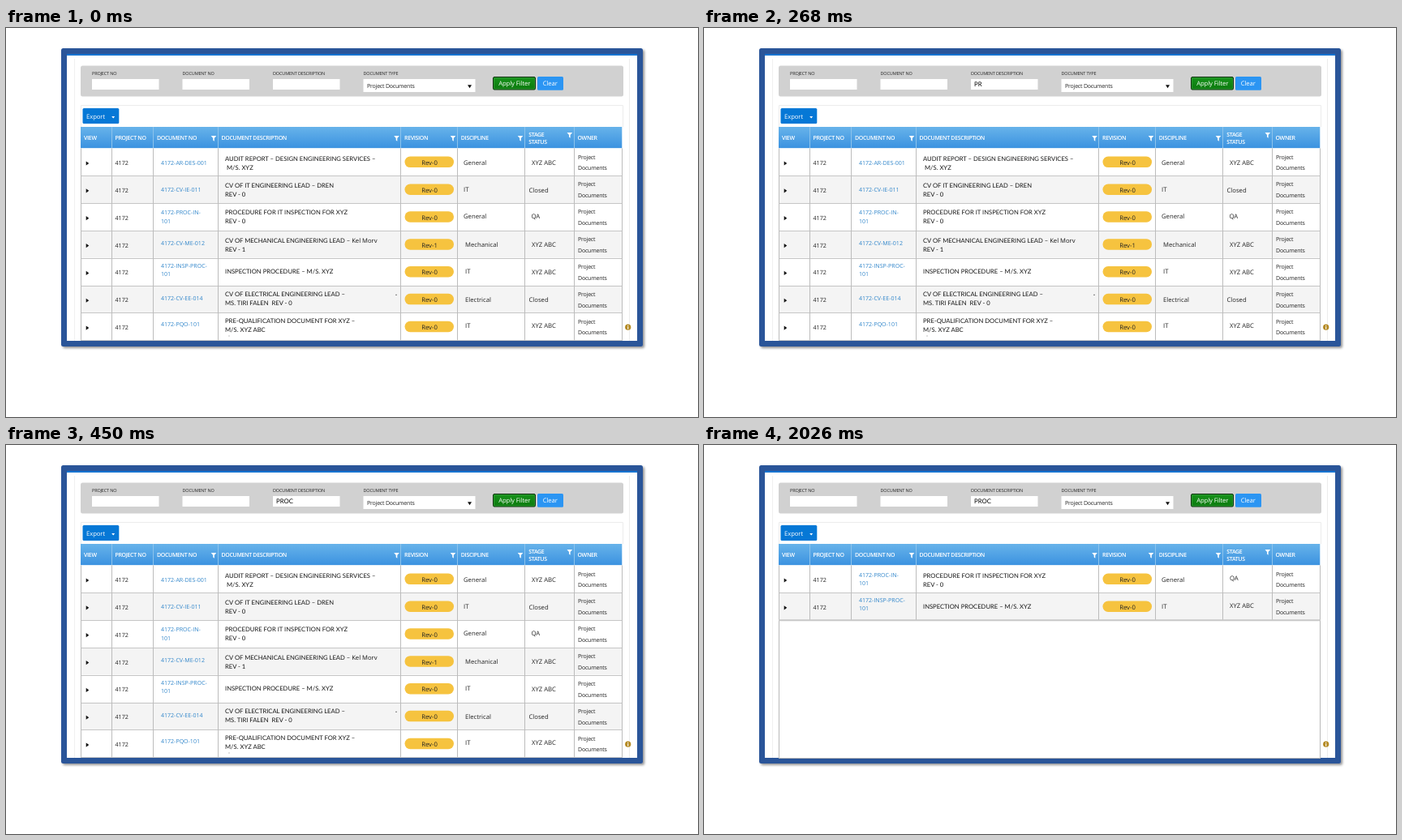
An HTML page for the animation above (2990 ms loop, 853x480 px).

```html
<!DOCTYPE html>
<html lang="en">
<head>
<meta charset="utf-8">
<title>Document filter</title>
<style>
html, body { margin: 0; width: 100%; height: 100%; overflow: hidden; background: #fff; }
svg { display: block; width: 853px; height: 480px; }
text {
  font-family: "Open Sans", "Noto Sans", sans-serif; font-size: 7.7px; fill: #222;
  white-space: pre; text-rendering: geometricPrecision;
}
.label { font-size: 5.5px; letter-spacing: -.16px; }
.head { font-size: 7px; font-weight: 600; letter-spacing: -.34px; fill: #fff; }
.small { font-size: 7px; letter-spacing: -.2px; }
.num { font-size: 7.2px; }
.link { font-size: 7.05px; fill: #2f85ca; }
.desc { font-family: Lato, Carlito, sans-serif; font-size: 7.65px; fill: #151515; }
.name { font-family: "Open Sans", "Noto Sans", sans-serif; }
.typed { font-family: Lato, Carlito, sans-serif; font-size: 7.8px; fill: #000; }
.mid { text-anchor: middle; }
.btn { fill: #fff; font-size: 7.7px; letter-spacing: -.08px; }
</style>
</head>
<body>
<svg id="stage" viewBox="0 0 853 480" xmlns="http://www.w3.org/2000/svg">
  <defs>
    <linearGradient id="bar" x1="0" y1="0" x2="0" y2="1">
      <stop offset="0" stop-color="#67b3ea"/>
      <stop offset="1" stop-color="#3b92e0"/>
    </linearGradient>
    <linearGradient id="apply" x1="0" y1="0" x2="0" y2="1">
      <stop offset="0" stop-color="#17931b"/>
      <stop offset="1" stop-color="#0b7a0d"/>
    </linearGradient>
    <filter id="shadow" x="-5%" y="-5%" width="110%" height="112%">
      <feDropShadow dx="2" dy="2" stdDeviation="1.8" flood-color="#000" flood-opacity=".42"/>
    </filter>
  </defs>
</svg>
<script>
const LOOP = 2990, FIRST_KEY = 60, KEY_GAP = 130, FILTER_AT = 580;
const WORD = "PROC";
const TOP = 148.4, ROW_H = 33.85, LEFT = 92, RIGHT = 760;
const COLS = [92, 130, 181, 261, 486, 556, 639, 700, 759];

const rect = (x, y, w, h, fill, extra = "") =>
  `<rect x="${x}" y="${y}" width="${w}" height="${h}" fill="${fill}" ${extra}/>`;
const line = (x1, y1, x2, y2, stroke, width = 1) =>
  `<path d="M${x1} ${y1}L${x2} ${y2}" stroke="${stroke}" stroke-width="${width}"/>`;
const text = (x, y, s, cls = "") => `<text x="${x}" y="${y}" class="${cls}">${s}</text>`;
const lines = (x, ys, list, cls) => list.map((s, i) => text(x, ys[i], s, cls)).join("");
const funnel = (x, y) =>
  `<path d="M${x - 3.3} ${y - 3.2}h6.6l-2.5 3v3.6l-1.6 -1.2v-2.4z" fill="#fff"/>`;

// Each cell holds [x, baselines, text lines].
const audit = {
  link: [191, [169], ["4172-AR-DES-001"]],
  desc: [270, [163.6, 174.6], ["AUDIT REPORT – DESIGN ENGINEERING SERVICES –", " M/S. XYZ"]],
  rev: 0, field: [564, 169, "General"], status: [648, 169, "XYZ ABC"]
};
const itLead = {
  link: [191, [202], ["4172-CV-IE-011"]],
  desc: [270, [197, 208], ["CV OF IT ENGINEERING LEAD – DREN", "REV - 0"]],
  rev: 0, field: [564, 202, "IT"], status: [644.5, 203, "Closed"]
};
const procedure = {
  link: [191, [230, 240.5], ["4172-PROC-IN-", "101"]],
  desc: [270, [230, 241], ["PROCEDURE FOR IT INSPECTION FOR XYZ", "REV - 0"]],
  rev: 0, field: [564, 235, "General"], status: [647.5, 235, "QA"]
};
const mechLead = {
  link: [191, [268], ["4172-CV-ME-012"]],
  desc: [270, [265, 276],
    ['CV OF MECHANICAL ENGINEERING LEAD – <tspan class="name">Kel Morv</tspan>', "REV - 1"]],
  rev: 1, field: [566, 270, "Mechanical"], status: [648, 270, "XYZ ABC"]
};
const inspection = {
  link: [191, [296, 306], ["4172-INSP-PROC-", "101"]],
  desc: [270, [303], ["INSPECTION PROCEDURE – M/S. XYZ"]],
  rev: 0, field: [566, 303, "IT"], status: [648, 304, "XYZ ABC"]
};
const elecLead = {
  link: [191, [336], ["4172-CV-EE-014"]],
  desc: [270, [331, 342], ["CV OF ELECTRICAL ENGINEERING LEAD –", "MS. TIRI FALEN\u00a0 REV - 0"]],
  rev: 0, field: [566, 338, "Electrical"], status: [644.5, 338, "Closed"]
};
const prequal = {
  link: [191, [368], ["4172-PQO-101"]],
  desc: [270, [364, 375], ["PRE-QUALIFICATION DOCUMENT FOR XYZ –", "M/S. XYZ ABC"]],
  rev: 0, field: [566, 370, "IT"], status: [648, 370, "XYZ ABC"]
};
const allRows = [audit, itLead, procedure, mechLead, inspection, elecLead, prequal];
const matches = [
  { ...procedure, link: [191, [163, 173.3], procedure.link[2]],
    desc: [270, [163.6, 174.6], procedure.desc[2]],
    field: [564, 169, "General"], status: [648, 167, "QA"] },
  { ...inspection, link: [191, [194, 204.3], inspection.link[2]],
    desc: [270, [202], inspection.desc[2]],
    field: [564, 202, "IT"], status: [648, 201, "XYZ ABC"] }
];

function drawRow(row, i) {
  const y = TOP + i * ROW_H, at = n => y + n - TOP;
  return rect(LEFT, y, RIGHT - LEFT, ROW_H, i % 2 ? "#f4f4f4" : "#fff") +
    `<path d="M98.7 ${at(164.4)}l3.6 2.6l-3.6 2.6z" fill="#111"/>` +
    text(134.5, at(169), "4172", "num") +
    lines(...row.link, "link") +
    lines(...row.desc, "desc") +
    rect(491.5, at(158.6), 60.5, 13.5, "#f6c33f", 'rx="6.7"') +
    text(522, at(169), "Rev-" + row.rev, "mid") +
    text(...row.field) + text(...row.status) +
    lines(705, [at(161.5), at(175.3)], ["Project", "Documents"], "small");
}

function drawTable(rows) {
  const end = TOP + rows.length * ROW_H;
  const rules = rows.map((_, i) => {
    const y = Math.round(TOP + (i + 1) * ROW_H - .1) + .5;
    return line(LEFT, y, RIGHT, y, "#c6c6c6");
  });
  const columns = COLS.map(x => line(x + .5, TOP, x + .5, end, "#bcbcbc"));
  return rows.map(drawRow).join("") + rules.join("") + columns.join("");
}

function drawFrame() {
  return `<g filter="url(#shadow)">${rect(68, 25, 717, 368, "#2c5599", 'rx="2.5"')}</g>` +
    rect(75, 32, 703, 354, "#fff") +
    rect(75, 32, 703, 2, "#1673d1") +
    line(84.5, 38, 84.5, 386, "#f0f0f0") + line(768.5, 38, 768.5, 386, "#ececec");
}

function drawFilters() {
  const inputs = [[106, "PROJECT NO"], [217.5, "DOCUMENT NO"], [329, "DOCUMENT DESCRIPTION"]];
  return rect(LEFT, 46.5, 669, 38, "#d1d1d1", 'rx="2.5"') +
    inputs.map(([x, s]) => text(x, 58.3, s, "label") + rect(x, 63, 82.5, 13, "#fff")).join("") +
    text(440.5, 58.3, "DOCUMENT TYPE", "label") +
    rect(440.5, 63, 138, 16, "#fff") +
    text(445, 74.3, "Project Documents", "small") +
    `<path d="M569 70.3h5l-2.5 4z" fill="#111"/>` +
    rect(600.5, 60.5, 52, 15.5, "url(#apply)", 'rx="1.5" stroke="#0d330d"') +
    rect(601.5, 61.5, 50, 13.5, "none", 'rx="1" stroke="#3fa643" stroke-width=".6"') +
    text(626.8, 70.9, "Apply Filter", "btn mid") +
    rect(655, 60, 32, 16.7, "#2b95f3", 'rx="1.5"') +
    text(670.8, 70.9, "Clear", "btn mid") +
    `<text id="typed" x="333" y="72.3" class="typed"></text>`;
}

function drawHeader() {
  const titles = [[96, "VIEW"], [134.5, "PROJECT NO"], [186, "DOCUMENT NO"],
    [265.5, "DOCUMENT DESCRIPTION"], [491, "REVISION"], [560.8, "DISCIPLINE"], [704.5, "OWNER"]];
  return `<path d="M92.5 122V95.5H760.5V122" fill="none" stroke="#ececec"/>` +
    rect(94.5, 99, 44.8, 19, "#0678d6", 'rx="1.5"') +
    text(99, 111.6, "Export", "btn") +
    `<path d="M130.2 109h4l-2 2.5z" fill="#fff"/>` +
    rect(LEFT, 122, 667.3, 26.4, "url(#bar)") +
    COLS.slice(1, -1).map(x => line(x + .5, 122, x + .5, 148, "#8cc3ec")).join("") +
    titles.map(([x, s]) => text(x, 137.6, s, "head")).join("") +
    lines(644.3, [133.6, 143.4], ["STAGE", "STATUS"], "head") +
    [256, 481.5, 551, 634].map(x => funnel(x, 136.3)).join("") + funnel(694.8, 132.3);
}

const info = `<circle cx="766.7" cy="369.2" r="3.6" fill="#b48a24"/>` +
  rect(766.1, 367, 1.2, 1.1, "#fff") + rect(766.1, 368.7, 1.2, 2.8, "#fff");
const specks = line(480, 329.3, 482, 329.3, "#555", .8) + line(274, 380, 276, 380, "#aaa", .7);
const emptyArea = rect(92.5, 216.5, 667, 170, "#fff", 'stroke="#b8b8b8"') +
  line(LEFT, 216.3, RIGHT, 216.3, "#c8c8c8", 2);

document.getElementById("stage").insertAdjacentHTML("beforeend",
  drawFrame() + drawFilters() + drawHeader() +
  `<g id="full">${drawTable(allRows)}${specks}</g>` +
  `<g id="found">${drawTable(matches)}${emptyArea}</g>` + info);

const typed = document.getElementById("typed");
const full = document.getElementById("full");
const found = document.getElementById("found");

function render(t) {
  const keys = Math.floor((t - FIRST_KEY) / KEY_GAP) + 1;
  typed.textContent = WORD.slice(0, Math.max(0, keys));
  const filtered = t >= FILTER_AT;
  full.style.display = filtered ? "none" : "";
  found.style.display = filtered ? "" : "none";
}

const start = performance.now();
function tick() {
  render((performance.now() - start) % LOOP);
  requestAnimationFrame(tick);
}
tick();
</script>
</body>
</html>
```
